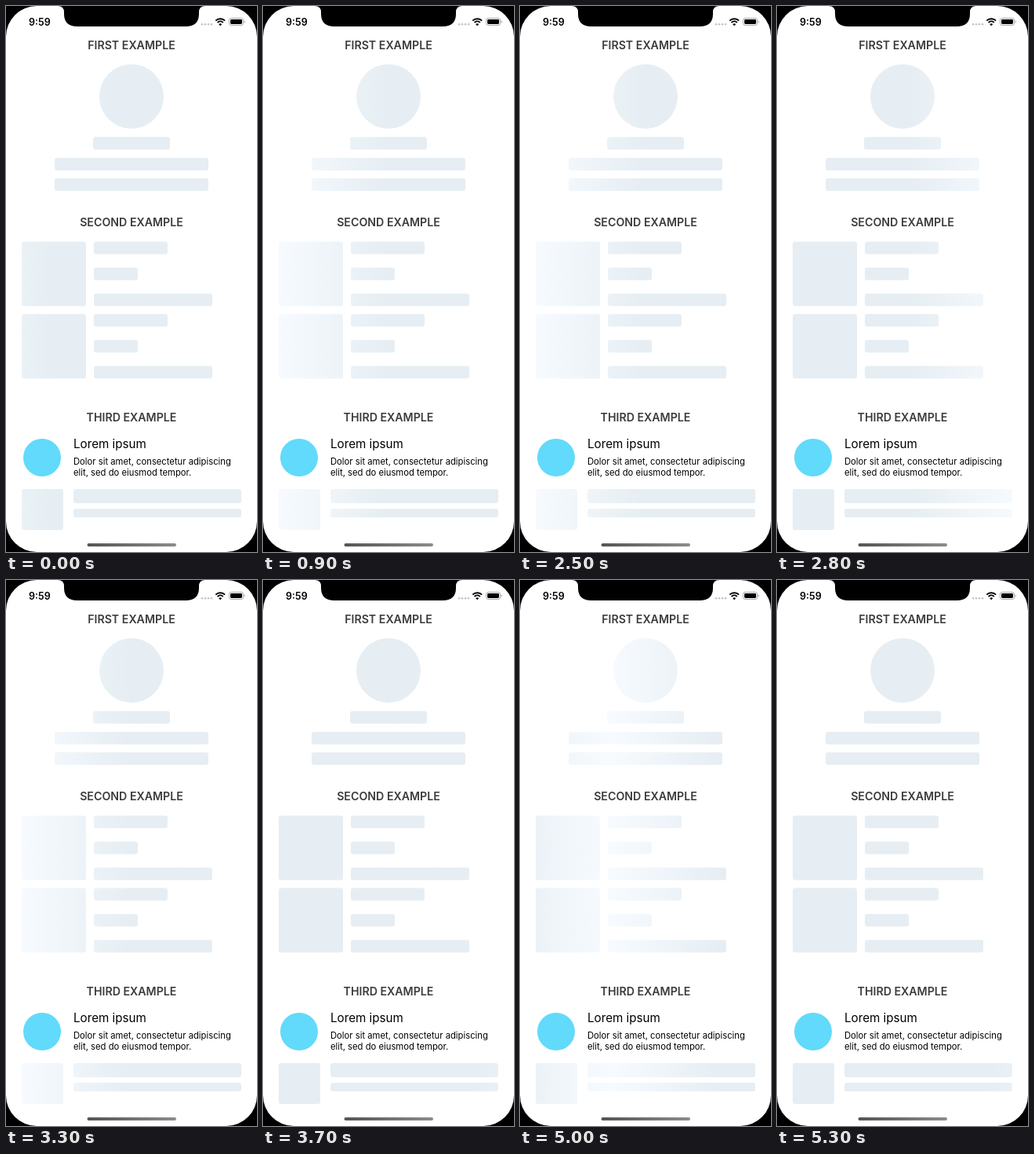
An HTML page for the animation above (5600 ms loop, 320 by 694 pixels).

```html
<!DOCTYPE html>
<html lang="en">
<head>
<meta charset="utf-8">
<title>Skeleton placeholders</title>
<style>
  html, body { margin: 0; width: 100%; height: 100%; overflow: hidden; background: #000; }
  svg { display: block; width: 320px; height: 694px; font-family: Inter, sans-serif; }
  .heading { font-size: 14.2px; font-weight: 600; fill: #3b3b3d; text-anchor: middle; }
</style>
</head>
<body>
<svg viewBox="0 0 320 694">
  <defs>
    <linearGradient id="shimmer" gradientUnits="userSpaceOnUse" x1="-140" x2="140" y1="0" y2="0">
      <stop offset="0" stop-color="#e6eef3"/>
      <stop offset=".5" stop-color="#f7fbff"/>
      <stop offset="1" stop-color="#e6eef3"/>
    </linearGradient>
    <linearGradient id="home">
      <stop offset="0" stop-color="#555"/>
      <stop offset="1" stop-color="#8c8c8c"/>
    </linearGradient>
  </defs>

  <rect width="320" height="694" rx="39" fill="#fff"/>
  <path d="M66 0Q74 0 74 8V10Q74 26 91 26H229Q246 26 246 10V8Q246 0 254 0Z"/>

  <!-- status bar -->
  <text x="29" y="24.5" font-size="12.5" font-weight="600">9:59</text>
  <g fill="#c4c4c6">
    <circle cx="250" cy="23.3" r="1.3"/><circle cx="254" cy="23.3" r="1.3"/>
    <circle cx="258" cy="23.3" r="1.3"/><circle cx="262" cy="23.3" r="1.3"/>
  </g>
  <g fill="none" stroke="#000" stroke-width="2">
    <path d="M267.3 18.6a8.4 8.4 0 0 1 11.8 0M269.6 21.1a5.1 5.1 0 0 1 7.2 0"/>
    <path d="M273.2 25.3l-2-2.1a2.9 2.9 0 0 1 4 0z" fill="#000" stroke="none"/>
  </g>
  <rect x="284.5" y="15.5" width="18" height="9" rx="2.6" fill="none" stroke="#a0a0a0" stroke-width=".9"/>
  <rect x="286" y="17" width="15" height="6" rx="1.4"/>
  <path d="M303.7 18.5q1.2 .4 1.2 1.5t-1.2 1.5z" fill="#a0a0a0"/>

  <text class="heading" x="160" y="54.5">FIRST EXAMPLE</text>
  <text class="heading" x="160" y="279.5">SECOND EXAMPLE</text>
  <text class="heading" x="160" y="527.5">THIRD EXAMPLE</text>

  <g id="blocks" fill="url(#shimmer)"></g>

  <circle cx="46" cy="574" r="24" fill="#61dafb"/>
  <text x="86" y="561.5" font-size="15.2">Lorem ipsum</text>
  <text font-size="11.25">
    <tspan x="86" y="583">Dolor sit amet, consectetur adipiscing</tspan>
    <tspan x="86" y="597">elit, sed do eiusmod tempor.</tspan>
  </text>
  <rect x="103.5" y="683" width="113.5" height="4" rx="2" fill="url(#home)"/>
</svg>
<script>
  const LOOP = 5600, CYCLE = 800, STEP = 100, LAST_STEP = 5;
  const blocks = document.getElementById('blocks');
  const shimmer = document.getElementById('shimmer');

  function block(x, y, width, height, rx = 3) {
    const rect = document.createElementNS('http://www.w3.org/2000/svg', 'rect');
    for (const [key, value] of Object.entries({ x, y, width, height, rx })) rect.setAttribute(key, value);
    blocks.append(rect);
  }

  block(119, 74, 82, 82, 41);
  block(111, 166.5, 98, 16);
  block(62, 193, 196, 16);
  block(62, 219, 196, 16);
  for (const y of [299.5, 391.5]) {
    block(20, y, 82, 82);
    block(112, y, 94, 16);
    block(112, y + 33, 56, 16);
    block(112, y + 66, 151, 16);
  }
  block(20, 614, 53, 52);
  block(86, 614, 214, 18);
  block(86, 639, 214, 11);

  // The highlight crosses in 100 ms steps, then rests until the next sweep.
  function render(now) {
    const time = now % LOOP;
    let step = Math.min(LAST_STEP, Math.floor((time % CYCLE) / STEP));
    if (step === 0 && time >= CYCLE) step = LAST_STEP;
    shimmer.setAttribute('gradientTransform', `translate(${-82 + 98 * step} 0)`);
  }

  const start = performance.now();
  (function tick() {
    render(performance.now() - start);
    requestAnimationFrame(tick);
  })();
</script>
</body>
</html>
```
